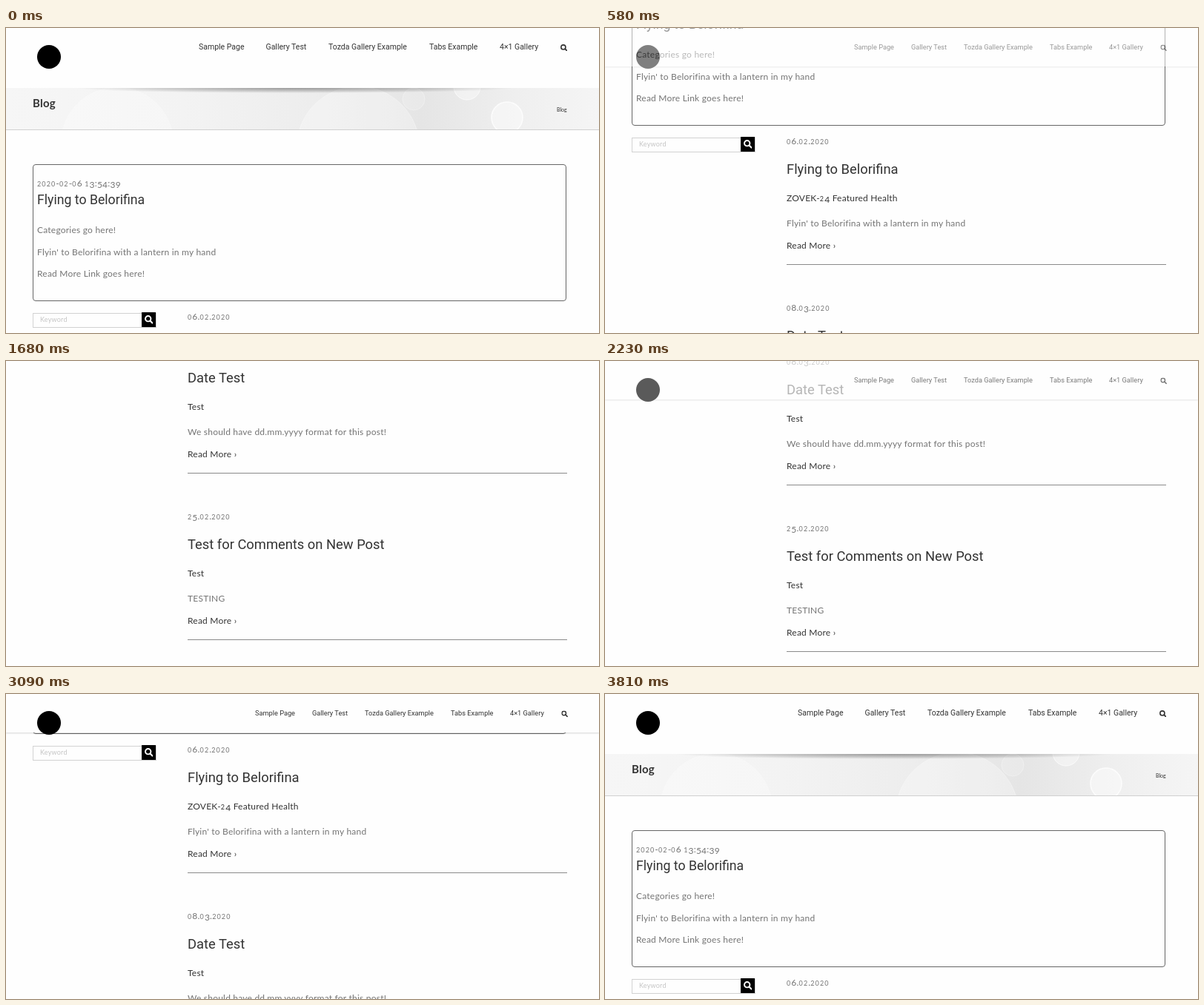
Animation, 800 px wide and 412 px high, one loop 4.26 s. Source, as an HTML page:

```html
<!DOCTYPE html>
<html lang="en">
<head>
<meta charset="utf-8">
<title>Blog</title>
<style>
html, body { margin: 0; width: 100%; height: 100%; overflow: hidden; background: #fefefe; }
#stage { position: relative; width: 800px; height: 412px; overflow: hidden; }
#page { position: absolute; left: 0; top: 0; width: 800px; height: 1100px; will-change: transform; }
#page > *, #head > * { position: absolute; }
.t { line-height: 20px; margin-top: -10px; white-space: pre; }
.body { font: 12px/20px Lato, sans-serif; letter-spacing: .22px; color: #747474; }
.dark { color: #333; }
.body i { font-style: normal; line-height: 0; }
.low { font-size: .75em; letter-spacing: 1.1px; }
.drop { position: relative; top: .17em; }
.h { font: 18.35px/20px Roboto, sans-serif; color: #333; }
.rule { left: 245px; width: 512px; height: 1.3px; background: #8a8a8a; }
#card { left: 36px; top: 183.7px; width: 718px; height: 183px; border: 1.5px solid #666; border-radius: 4px; }
#field { left: 36px; top: 384.5px; width: 165px; height: 18px; border: 1px solid #d2d2d2; }
#go { left: 183px; top: 384px; width: 19px; height: 19.5px; background: #000; }
#head { position: absolute; left: 0; top: 0; width: 800px; height: 81px; }
#bar { left: 0; top: 0; width: 100%; height: 100%; background: #fefefe; }
#logo { left: 42px; top: 22.5px; width: 32px; height: 32px; border-radius: 50%; background: #000; }
.nav { top: 26px; font-family: Roboto, sans-serif; color: #333; }
</style>
</head>
<body>
<div id="stage">
  <div id="page">
    <svg style="left:0;top:81px" width="800" height="57" viewBox="0 0 800 57">
      <defs>
        <linearGradient id="tone">
          <stop offset="0" stop-color="#f6f6f6"/>
          <stop offset=".3" stop-color="#f3f3f3"/>
          <stop offset=".52" stop-color="#ededed"/>
          <stop offset=".7" stop-color="#e5e5e5"/>
          <stop offset=".86" stop-color="#efefef"/>
          <stop offset="1" stop-color="#f5f5f5"/>
        </linearGradient>
        <radialGradient id="shade">
          <stop offset="0" stop-color="#000" stop-opacity=".36"/>
          <stop offset=".6" stop-color="#000" stop-opacity=".16"/>
          <stop offset="1" stop-color="#000" stop-opacity="0"/>
        </radialGradient>
      </defs>
      <rect width="800" height="57" fill="url(#tone)"/>
      <g fill="#fff" stroke="#fff">
        <circle cx="150" cy="75" r="76" fill-opacity=".25" stroke-opacity=".2"/>
        <circle cx="475" cy="81" r="83" fill-opacity=".28" stroke-opacity=".3"/>
        <circle cx="550" cy="15" r="15" fill-opacity=".18" stroke-opacity=".3"/>
        <circle cx="622" cy="-2" r="18" fill-opacity=".35" stroke-opacity=".7"/>
        <circle cx="676" cy="40" r="21" fill-opacity=".4" stroke-opacity=".8" stroke-width="1.5"/>
      </g>
      <ellipse cx="390" rx="295" ry="7" fill="url(#shade)"/>
      <rect y="56" width="800" height="1" fill="#d0d0d0"/>
    </svg>
    <div id="card"></div>
    <div id="field"></div>
    <div id="go"></div>
  </div>
  <div id="head">
    <div id="bar"></div>
    <div id="logo"></div>
  </div>
</div>
<script>
const LOOP = 4260;
const $ = id => document.getElementById(id);
const page = $('page'), head = $('head'), bar = $('bar');

// Old-style figures: short 0-2, dropped 3-5, 7 and 9
const figures = s => s
  .replace(/[0-9]/g, d => '012'.includes(d) ? `<i class="low">${d}</i>`
    : '68'.includes(d) ? d : `<i class="drop">${d}</i>`);

function text(parent, x, y, str, cls, style = '') {
  const el = document.createElement('div');
  el.className = 't ' + cls;
  el.style.cssText = `left:${x}px;top:${y}px;${style}`;
  el.innerHTML = cls.startsWith('body') ? figures(str) : str;
  parent.append(el);
  return el;
}

function lens(parent, x, y, size, color) {
  parent.insertAdjacentHTML('beforeend',
    `<svg style="left:${x - size / 2}px;top:${y - size / 2}px" width="${size}" height="${size}" viewBox="0 0 10 10"
      fill="none" stroke="${color}"><circle cx="4.1" cy="4.1" r="3.2" stroke-width="1.7"/>
      <path d="M6.5 6.5L9.2 9.2" stroke-width="1.9" stroke-linecap="round"/></svg>`);
  return parent.lastElementChild;
}

const title = 'Flying to Belorifina';
const line = "Flyin' to Belorifina with a lantern in my hand";

text(page, 36, 100.5, 'Blog', 'body dark', 'font-size:15px;font-weight:700;letter-spacing:.2px');
text(page, 743, 109.5, 'Blog', 'body dark', 'font-size:7px;letter-spacing:0');
text(page, 42, 210, '2020-02-06 13:54:39', 'body');
text(page, 42, 231.7, title, 'h', 'font-size:17.7px');
text(page, 42, 273, 'Categories go here!', 'body');
text(page, 42, 302.8, line, 'body');
text(page, 42, 332.3, 'Read More Link goes here!', 'body');
text(page, 46, 394, 'Keyword', 'body', 'font-size:9px;color:#c4c4c4');
lens(page, 192.5, 394, 11.5, '#fff');

[
  ['06.02.2020', title, 'ZOVEK-24 Featured Health', line],
  ['08.03.2020', 'Date Test', 'Test', 'We should have dd.mm.yyyy format for this post!'],
  ['25.02.2020', 'Test for Comments on New Post', 'Test', 'TESTING']
].forEach(([date, name, tags, intro], i) => {
  const y = 389.5 + 225 * i;
  text(page, 245, y, date, 'body');
  text(page, 245, y + 38.3, name, 'h');
  text(page, 245, y + 77.2, tags, 'body dark');
  text(page, 245, y + 111, intro, 'body');
  text(page, 245, y + 141.8, 'Read More ›', 'body dark');
  page.insertAdjacentHTML('beforeend', `<div class="rule" style="top:${y + 166}px"></div>`);
});

// Menu label, left edge when tall, left edge when compact
const menu = [
  ['Sample Page', 260, 336], ['Gallery Test', 350.5, 413], ['Tozda Gallery Example', 435, 484],
  ['Tabs Example', 571, 600], ['4×1 Gallery', 666, 680]
].map(([label, a, b]) => ({ el: text(head, a, 26, label, 'nav'), a, b }));
const find = lens(head, 752.3, 26.3, 9.5, '#333');

// Monotone cubic curve through [time, value] keys
function curve(keys) {
  const slope = i => (keys[i + 1][1] - keys[i][1]) / (keys[i + 1][0] - keys[i][0]);
  const tangent = i => {
    if (i === 0 || i === keys.length - 1) return 0;
    const a = slope(i - 1), b = slope(i);
    return a * b > 0 ? 2 * a * b / (a + b) : 0;
  };
  return t => {
    if (t <= keys[0][0]) return keys[0][1];
    const i = keys.findIndex(k => k[0] > t) - 1;
    if (i < 0) return keys[keys.length - 1][1];
    const [t0, v0] = keys[i], [t1, v1] = keys[i + 1];
    const d = t1 - t0, u = (t - t0) / d, w = 1 - u;
    return v0 * w * w * (1 + 2 * u) + v1 * u * u * (3 - 2 * u)
      + d * u * w * (w * tangent(i) - u * tangent(i + 1));
  };
}

const scroll = curve([
  [214, 0], [580, 237], [1130, 527], [1280, 556],
  [1400, 556], [1680, 630], [1820, 635],
  [2060, 635], [2620, 480], [3090, 315], [3260, 285],
  [3410, 285], [3810, 0]
]);
const fade = curve([[430, 1], [580, .5], [740, 0], [2100, 0], [2300, 1]]);
const shrink = curve([[250, 0], [500, 1], [3570, 1], [3810, 0]]);

// The picture refreshes at these moments: first, last, count
const ticks = [
  [290, 580, 5], [670, 750, 2], [820, 1130, 5], [1210, 1280, 2], [1480, 1680, 4],
  [1760, 1820, 2], [2140, 3020, 12], [3090, 3260, 3], [3490, 3810, 5]
].flatMap(([a, b, n]) => Array.from({ length: n }, (_, i) => a + (b - a) * i / (n - 1)));

const mix = (a, b, k) => a + (b - a) * k;

function draw(now) {
  const t = ticks.reduce((last, tick) => tick <= now + .5 ? tick : last, 0);
  const k = shrink(t);
  page.style.transform = `translateY(${-Math.round(scroll(t))}px)`;
  head.style.opacity = fade(t);
  head.style.height = mix(81, 52, k) + 'px';
  bar.style.boxShadow = `0 1px 2px rgba(0,0,0,${.16 * k})`;
  for (const { el, a, b } of menu) {
    el.style.left = mix(a, b, k) + 'px';
    el.style.fontSize = mix(10.5, 9.23, k) + 'px';
  }
  find.style.transform = `translateX(${.8 * k}px) scale(${mix(1, .9, k)})`;
}

const start = performance.now();
function frame() {
  draw((performance.now() - start) % LOOP);
  requestAnimationFrame(frame);
}
frame();
</script>
</body>
</html>
```
